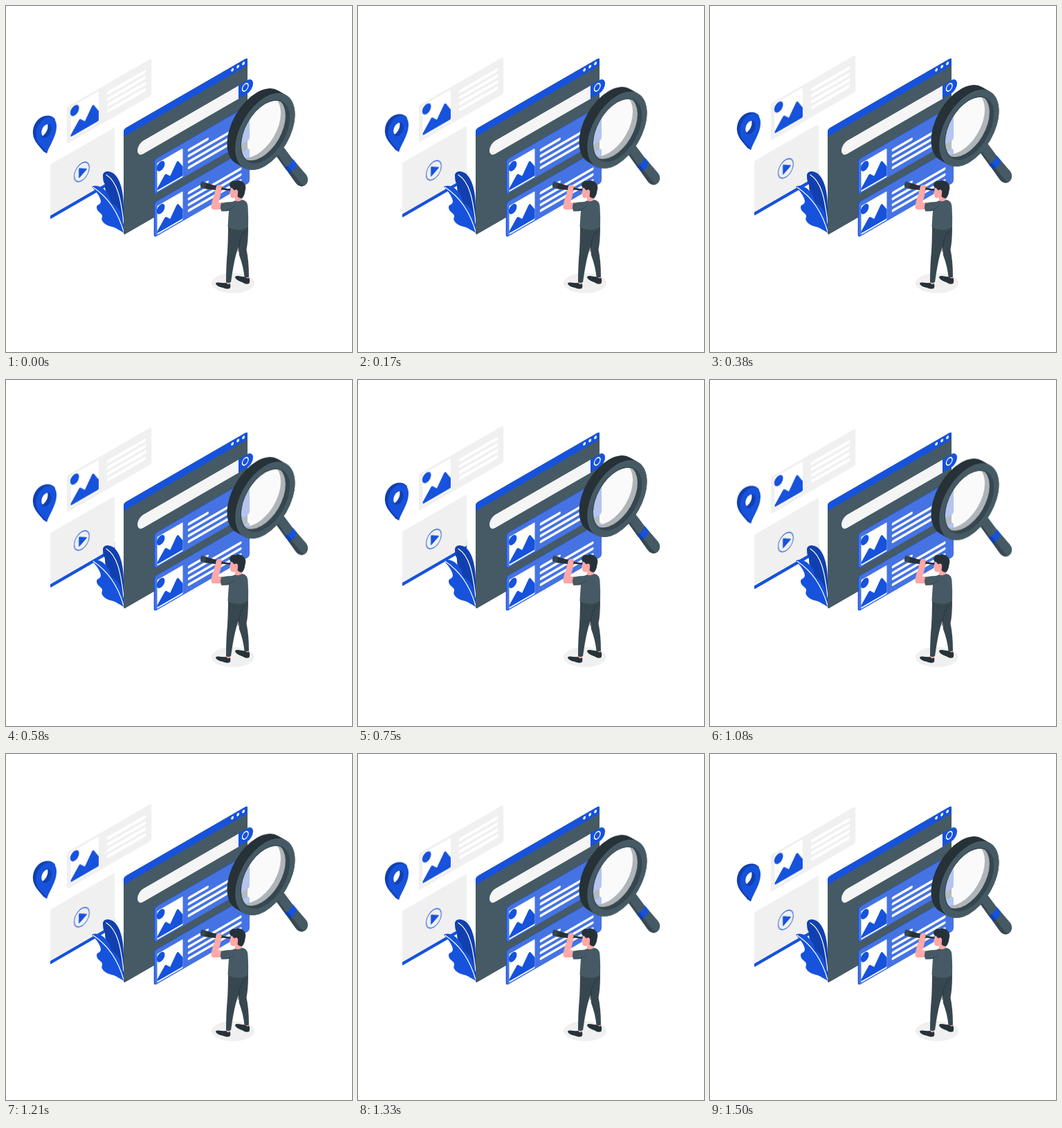
Write an HTML page that moves like this. It is 500 px wide and 500 px high and loops after 1540 ms.

```html
<!DOCTYPE html>
<html lang="en">
<head>
<meta charset="utf-8">
<title>Search illustration</title>
<style>
  html, body { margin: 0; width: 100%; height: 100%; overflow: hidden; background: #fff; }
  svg { display: block; width: 100vw; height: 100vh; }
  .blue { fill: #1652dc; }
  .navy { fill: #1140ae; }
  .white { fill: #fff; }
  .pale { fill: #f0f0f0; }
  .slate { fill: #455a64; }
  .steel { fill: #37474f; }
  .ink { fill: #263238; }
  .skin { fill: #ffa8a7; }
  .line { fill: none; stroke: #fff; stroke-linecap: round; }
  /* 24 steps a second: 18 up, 18 down, one at rest */
  .float { animation: float 1540ms -5ms infinite; }
  @keyframes float {
    0% { transform: translateY(0); animation-timing-function: steps(18); }
    48.649% { transform: translateY(-10px); animation-timing-function: steps(18); }
    97.297%, 100% { transform: translateY(0); }
  }
</style>
</head>
<body>
<svg viewBox="0 0 500 500">
  <defs>
    <g id="picture">
      <rect class="white" width="46.5" height="45" rx="1.5"/>
      <circle class="blue" cx="6.5" cy="8" r="7.3"/>
      <path class="blue" d="M0 40 13.5 25.5Q15 24 16.500 25.500L23.500 32 35 16.500Q37 14 39 17L46.500 28.500V41.500Q46.500 43 45 43H1.500Q0 43 0 41.500Z"/>
    </g>
    <g id="result">
      <rect class="blue" x="-1.500" y="-.5" width="159" height="50.500" rx="4"/>
      <rect width="158.200" height="50" rx="4" fill="#4573e3"/>
      <use href="#picture" transform="translate(4 7) scale(.92)"/>
      <path class="line" stroke-width="4" d="M57 14.500H88M57 23H143M57 31.500H143M57 40H143"/>
    </g>
    <circle id="hole" r="40"/>
    <clipPath id="front"><use href="#hole"/></clipPath>
    <mask id="through" maskUnits="userSpaceOnUse" x="-80" y="-80" width="160" height="160">
      <path fill="#fff" d="M-80-80H80V80H-80Z"/>
      <g clip-path="url(#front)"><use href="#hole" x="-13.900" y="-13.900" fill="#000"/></g>
    </mask>
  </defs>

  <!-- text card -->
  <g class="float">
    <g transform="matrix(.866 -.5 0 1 88 146)">
      <rect class="pale" width="141" height="53.500" rx="3"/>
      <use href="#picture" x="6.500" y="3.500"/>
      <path class="line" stroke-width="4.600" d="M69 14H130M69 22.700H130M69 31.400H130M69 40.100H130"/>
    </g>
  </g>

  <!-- video card -->
  <g class="float">
    <g transform="matrix(.866 -.5 0 1 64 229)">
      <rect class="blue" y="66" width="107.500" height="13" rx="1.500"/>
      <path class="pale" d="M0 74V3Q0 0 3 0H104.500Q107.500 0 107.500 3V74Z"/>
      <circle cx="52.500" cy="37" r="12.600" fill="none" stroke="#1652dc" stroke-width="1.100"/>
      <path class="blue" d="M47.500 30.500Q47.500 29 49 29.800L60.500 36.200Q62 37 60.500 37.800L49 43.500Q47.500 44 47.500 42.500Z"/>
    </g>
  </g>

  <!-- pin -->
  <g class="float">
    <path class="navy" d="M39 185C38 171 47 160 58 158.500C64 158 69 160 71 164L59 213 54 210C49 203 40 196 39 185Z"/>
    <path class="blue" d="M59 213C56 204 43.500 201 43.500 186C43.500 173 52 162 62 160.500C69 159.500 73.500 166 73 175C72.500 189 63 201 59 213Z"/>
    <path class="navy" d="M51 183.500C51 177 55 171.500 59.500 170.500C63.500 170 66 173 65.500 177.500C65 184 61 189.500 56.500 190.500C53 191 51 188 51 183.500Z"/>
    <path class="white" d="M51.300 183C51.300 177 55 172 60 170.800C61.500 176 59 183.500 53 187.800C51.800 186.500 51.300 185 51.300 183Z"/>
  </g>

  <!-- leaves -->
  <path class="navy" d="M140 245C140 239 147 237 154 241C165 248 170 268 170 290V322C165 309 164 295 155 289C147 284 151 277 146 271C141 264 145 259 141 254Q140 250 140 245Z"/>
  <path class="line" stroke-width="1.200" d="M145 244C161 254 166 278 170 314"/>
  <path class="blue" d="M124 261C132 257 142 263 147 271C152 278 149 283 156 287C165 292 168 303 171 328C164 325 161 321 153 319C143 317 136 310 139 305C141 300 131 298 131 291C131 286 137 288 137 282C136 275 131 269 124 261Z"/>
  <path class="line" stroke-width="1.200" d="M126 262C147 276 162 298 170 326"/>

  <!-- browser window -->
  <g transform="matrix(.866 -.5 0 1 170 178)">
    <rect class="slate" width="206.700" height="153" rx="3"/>
    <path class="blue" d="M0 11V5Q0 0 5 0H203.500Q206.700 0 206.700 3V11Z"/>
    <g class="white">
      <circle cx="181.500" cy="5" r="2.200"/>
      <circle cx="190.700" cy="5" r="2.200"/>
      <circle cx="199.900" cy="5" r="2.200"/>
    </g>
    <path fill="#f5f5f5" d="M192 33H32.500A9.500 9.500 0 0 0 32.500 52H192Z"/>
    <path class="blue" d="M191.700 32.500H206.500A9.500 9.500 0 0 1 206.500 51.500H191.700Z"/>
    <circle class="line" cx="203" cy="41" r="5" stroke-width="1.500"/>
  </g>
  <use href="#result" transform="matrix(.866 -.5 0 1 215 222)"/>
  <use href="#result" transform="matrix(.866 -.5 0 1 215 284)"/>

  <!-- man with spyglass -->
  <ellipse class="pale" cx="328" cy="400.500" rx="31" ry="14.500"/>
  <path class="skin" d="M318 397H324V403H318ZM345.500 389H351V396H345.500Z"/>
  <path class="ink" d="M303 401Q303 399 307 399.500Q314 400.500 318 400Q321 404 324 401Q325 405 323.500 408Q319 410 313 407Q304 405 303 401ZM331 392Q331 390 335 390Q342 391 345.500 391.500Q349 395 351.500 392.500Q353 397 351.500 401Q347 403 342 399.500Q332 396 331 392Z"/>
  <path class="steel" d="M333 319H350Q350 340 347.500 352Q351 368 351 391.500Q348 393 344.500 391.500Q343 376 337 360Z"/>
  <path class="steel" d="M321 316H344Q340 337 335 351Q330 364 325 399Q321 401 318 399Q318 374 320 354Q321 337 321 316Z"/>
  <path d="M347 325Q339 329 337 345L335.500 355" fill="none" stroke="#263238" stroke-width=".8"/>
  <path class="skin" d="M325 264Q326 258 334 259L339 276Q337 281 333 282L331 277Q325 279 324.500 274L323 271Z"/>
  <path class="skin" d="M303 263Q306 257 311 259Q315 263 311 269Q309 279 307 284L314 284 314 294 299 294Q296 293 296.500 289Q298 279 301 273Z"/>
  <path class="slate" d="M311 285Q318 283 327 283Q332 280 341 280Q349 281 349.500 290Q350.500 305 350 319Q342 325 331 323Q324 322 320.500 319L322 296Q316 297 311 296Q309 291 311 285Z"/>
  <path class="skin" d="M331 276H341V280Q336 284 331 281Z"/>
  <path d="M311 296Q325 296 330 289" fill="none" stroke="#37474f" stroke-width=".9"/>
  <path class="ink" d="M323 258Q325 252 331 253Q338 250 343 255Q348 260 345.500 267Q345 274 341 278Q337 278 334.500 275Q336 269 333 265Q329 268 327 263Q323 263 323 258Z"/>
  <ellipse class="skin" cx="333" cy="269" rx="2.200" ry="3.200"/>
  <path class="ink" d="M287 255 304 260 303 266 286 264ZM303 260.500 313 262 312 266 303 265.500ZM312 262.500 324 264.500V267L312 265.500Z"/>
  <path class="steel" d="M283 253.500 290 255.500Q287.500 260 288.500 264L281.500 262.500Q279.500 258 283 253.500Z"/>
  <path class="skin" d="M304 261Q307 257 311 260Q313 264 309 268L304 270Q302 265 304 261Z"/>

  <!-- magnifier -->
  <g class="float">
    <path class="steel" d="M387 212 401 204 414 222 405 237Z"/>
    <path class="slate" d="M390 211 402 205 417 225 406 234Z"/>
    <path class="slate" d="M404 235 416 223 434 244Q438 250 435 256Q431 262 424 260Q421 259 418 255Z"/>
    <path class="steel" d="M404 235 407 232 425 255Q427 258 431 259.500Q426 262 421 258Z"/>
    <path class="blue" d="M403 233Q411 231 414.500 221L420 228Q418 238 409 241Z"/>
    <path class="navy" d="M403 233 407 231.500 413 239 409 241Z"/>
    <g transform="matrix(.866 -.5 0 1 374.500 181.500)">
      <g mask="url(#through)">
        <path class="ink" d="M35.100-35.100A49.600 49.600 0 0 1-35.100 35.100L-49 21.200A49.600 49.600 0 0 1 21.200-49Z"/>
        <circle class="slate" r="49.600"/>
        <circle class="steel" r="40.800"/>
      </g>
      <g clip-path="url(#front)">
        <use href="#hole" x="-6" y="-6" fill="#f7f7f7" opacity=".62"/>
      </g>
      <circle r="40.500" fill="none" stroke="#37474f"/>
      <circle r="49.200" fill="none" stroke="#56696f" stroke-width=".6"/>
    </g>
  </g>
</svg>
</body>
</html>
```
